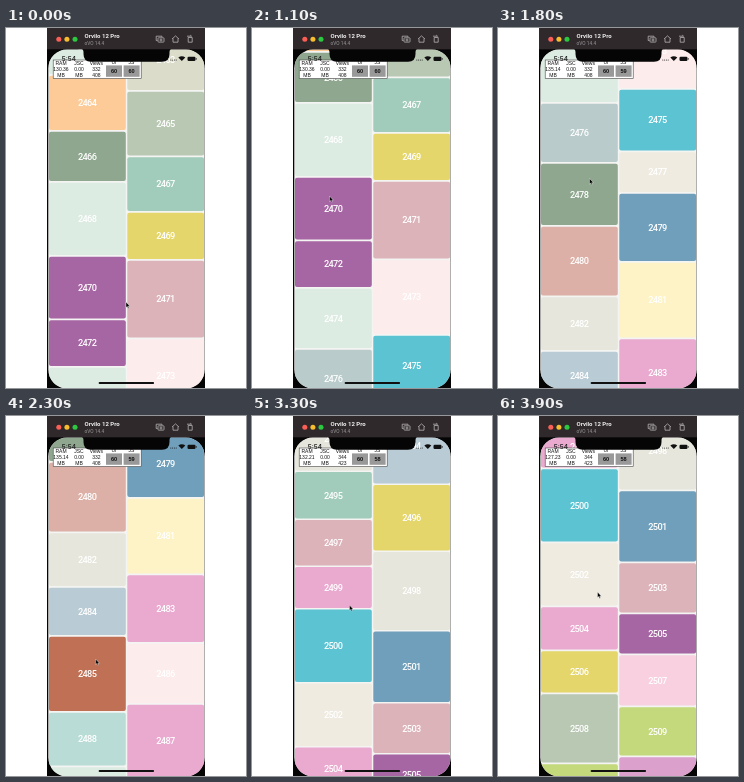
An HTML page for the animation above (4 s loop, 240x360 px).

```html
<!DOCTYPE html>
<html lang="en">
<head>
<meta charset="utf-8">
<title>Masonry list scroll</title>
<style>
  html, body { margin: 0; width: 100%; height: 100%; overflow: hidden; background: #fff; }
  svg { display: block; width: 240px; height: 360px; font-family: Roboto, "Liberation Sans", sans-serif; }
  .tile { font-size: 9.2px; font-weight: 500; letter-spacing: -.65px; fill: #fff; text-anchor: middle; }
  .stats { font: 5px "Liberation Sans", Arial, sans-serif; text-anchor: middle; fill: #111; }
  .fps { font-weight: 700; font-size: 5.6px; }
  .clock { font: 600 6.4px Inter, sans-serif; fill: #222; }
  .icon { fill: none; stroke: #b5b1b3; stroke-width: .8; stroke-linejoin: round; }
</style>
</head>
<body>
<svg viewBox="0 0 240 360">
  <defs>
    <clipPath id="screen"><rect x="42.3" y="21.5" width="156.4" height="339" rx="19"/></clipPath>
  </defs>

  <rect x="41" width="158" height="360" fill="#050505"/>
  <g clip-path="url(#screen)">
    <rect x="42" y="21" width="157" height="339" fill="#f4f4f2"/>
    <g id="list" class="tile"></g>
  </g>

  <g class="stats">
    <rect x="47.2" y="32" width="88" height="18.6" fill="#fff" stroke="#444" stroke-width=".6"/>
    <text x="55" y="37.3">RAM</text><text id="ram" x="55" y="43.3"></text><text x="55" y="49.3">MB</text>
    <text x="73" y="37.3">JSC</text><text x="73" y="43.3">0.00</text><text x="73" y="49.3">MB</text>
    <text x="90.3" y="37.3">Views</text><text id="views" x="90.3" y="43.3"></text><text id="total" x="90.3" y="49.3"></text>
    <text x="108" y="36">UI</text><text x="125.3" y="36">JS</text>
    <rect x="100" y="37.4" width="16" height="11.4" fill="#999"/>
    <rect x="117.6" y="37.4" width="16" height="11.4" fill="#999"/>
    <text class="fps" x="108" y="45.2">60</text>
    <text id="js" class="fps" x="125.5" y="45.2"></text>
  </g>
  <text class="clock" x="55.8" y="33.3">5:54</text>
  <path d="M74 20H167Q163.5 21 163.5 24V26Q163.5 33.8 156 33.8H85Q77.5 33.8 77.5 26V24Q77.5 21 74 20Z" fill="#050505"/>

  <g fill="#111">
    <circle cx="164.8" cy="32" r=".5"/><circle cx="166.6" cy="32" r=".5"/>
    <circle cx="168.4" cy="32" r=".5"/><circle cx="170.2" cy="32" r=".5"/>
    <path d="M172.3 29.5Q175.8 26.8 179.3 29.5L175.8 33Z"/>
    <rect x="181.5" y="28.8" width="8" height="4.2" rx="1.2"/>
    <rect x="189.9" y="30.1" width=".7" height="1.6"/>
    <rect x="92.6" y="354" width="55.5" height="2" rx="1"/>
  </g>

  <rect x="41" width="158" height="21.3" fill="#2f292c"/>
  <circle cx="52.8" cy="11.2" r="2.5" fill="#f95f56"/>
  <circle cx="60.9" cy="11.2" r="2.5" fill="#f8bd2e"/>
  <circle cx="69" cy="11.2" r="2.5" fill="#2cc840"/>
  <text x="78.5" y="10.4" font-size="6" font-weight="700" fill="#eee">Orvilo 12 Pro</text>
  <text x="78.5" y="16.5" font-size="4.8" fill="#9b9799">oVO 14.4</text>
  <g class="icon">
    <path d="M151.5 12.5H150.2V8.2H156V9.2"/>
    <rect x="152" y="9.8" width="6" height="4.3" rx=".6"/><circle cx="155" cy="12" r="1"/>
    <path d="M166 11L169.5 7.9L173 11M167 10.5V14.2H172V10.5"/>
    <path d="M182.2 9.5H186.2V14.2H182.2ZM181 8.2H185.5M184.3 7.2L185.5 8.2"/>
  </g>

  <path id="cursor" d="M0 0V5.6L1.3 4.5L2.1 6.4L3 6L2.2 4.2H3.9Z" fill="#000" stroke="#fff" stroke-width=".4"/>
</svg>

<script>
const LOOP = 4000, STEP = 100;
const $ = id => document.getElementById(id);

const C = {
  mint: '#dcece2', peach: '#fdcb98', moss: '#8fa78f', plum: '#a665a3', mist: '#b9cbcb',
  clay: '#dcb0a6', stone: '#e6e6dc', steel: '#b9cbd4', rust: '#c07054', aqua: '#b9ddd6',
  jade: '#a1cbba', rose: '#dcb3b9', pink: '#eaa9cf', cyan: '#5cc3d2', cream: '#efebe1',
  gold: '#e5d66c', sage: '#b9c8b3', lime: '#c4d87c', blush: '#fdecec', blue: '#709fbb',
  lemon: '#fdf3c7', ice: '#b9d0d3', petal: '#f8d0df', orchid: '#dca0cc', sand: '#dcdccb'
};

// Tiles: label, row height, colour
const left = [
  [2462, 57, 'mint'], [2464, 56, 'peach'], [2466, 51, 'moss'], [2468, 74, 'mint'],
  [2470, 63.5, 'plum'], [2472, 47.5, 'plum'], [2474, 61, 'mint'], [2476, 60, 'mist'],
  [2478, 63, 'moss'], [2480, 70.5, 'clay'], [2482, 54.5, 'stone'], [2484, 49, 'steel'],
  [2485, 76, 'rust'], [2488, 54.5, 'aqua'], [2489, 49.5, 'mint'], [2491, 60.5, 'peach'],
  [2493, 64.5, 'stone'], [2495, 48, 'jade'], [2497, 47, 'rose'], [2499, 42.5, 'pink'],
  [2500, 74, 'cyan'], [2502, 64, 'cream'], [2504, 44, 'pink'], [2506, 43, 'gold'],
  [2508, 70, 'sage'], [2510, 60, 'lime']
];
const right = [
  [2463, 63, 'sand'], [2465, 65.5, 'sage'], [2467, 55.5, 'jade'], [2469, 48, 'gold'],
  [2471, 78.5, 'rose'], [2473, 75.5, 'blush'], [2475, 62.5, 'cyan'], [2477, 41.5, 'cream'],
  [2479, 69, 'blue'], [2481, 76.5, 'lemon'], [2483, 68.5, 'pink'], [2486, 61, 'blush'],
  [2487, 74, 'pink'], [2490, 52, 'sage'], [2492, 47, 'ice'], [2494, 77, 'steel'],
  [2496, 67, 'gold'], [2498, 79.5, 'stone'], [2501, 72, 'blue'], [2503, 51, 'rose'],
  [2505, 41, 'plum'], [2507, 52, 'petal'], [2509, 50, 'lime'], [2511, 60, 'orchid']
];

function add(tag, attrs, text = '') {
  const el = document.createElementNS('http://www.w3.org/2000/svg', tag);
  for (const k in attrs) el.setAttribute(k, attrs[k]);
  el.textContent = text;
  $('list').append(el);
}

function column(tiles, x, y) {
  for (const [label, h, colour] of tiles) {
    add('rect', { x, y, width: 76.8, height: h - 1.7, rx: 2, fill: C[colour] });
    add('text', { x: x + 38.1, y: y + h / 2 + 2.4 }, label);
    y += h;
  }
}
column(left, 43, -9.2);
column(right, 121.3, 0.8);

// Monotone cubic curve through [time, value] points
function curve(pts) {
  const d = pts.slice(1).map((p, i) => (p[1] - pts[i][1]) / (p[0] - pts[i][0]));
  const m = pts.map((_, i) => {
    const a = d[i - 1] ?? d[i], b = d[i] ?? a;
    return a * b > 0 ? 2 * a * b / (a + b) : 0;
  });
  return t => {
    let i = 0;
    while (i < pts.length - 2 && t >= pts[i + 1][0]) i++;
    const [t0, v0] = pts[i], [t1, v1] = pts[i + 1];
    const w = t1 - t0, u = (t - t0) / w, r = 1 - u;
    return v0 * (1 + 2 * u) * r * r + v1 * u * u * (3 - 2 * u) + w * u * r * (m[i] * r - m[i + 1] * u);
  };
}

const scroll = curve([[0, 0], [700, 10], [1100, 79], [1450, 198], [1800, 325], [2300, 477],
  [2600, 640], [2900, 798], [3200, 920], [3600, 1013], [3900, 1087], [4000, 1122]]);
const cursorX = curve([[0, 120], [700, 105], [1100, 77.5], [1800, 91.5], [2300, 89.6], [2900, 93], [3600, 99.5], [4000, 99.5]]);
const cursorY = curve([[0, 274], [700, 266], [1100, 168], [1200, 153], [1500, 241], [1800, 150.5], [2300, 243],
  [2550, 160], [2900, 241.5], [3150, 165], [3600, 258], [3900, 176], [4000, 156]]);

// From time: memory, views, total views, JS frame rate
const stats = [
  [0, '130.36', 332, 408, 60], [1500, '135.14', 332, 408, 59],
  [2600, '132.21', 344, 423, 59], [3200, '132.21', 344, 423, 58], [3700, '127.23', 344, 423, 58]
];

function draw(now) {
  const t = Math.floor(now % LOOP / STEP) * STEP;
  $('list').setAttribute('transform', `translate(0 ${-scroll(t)})`);
  $('cursor').setAttribute('transform', `translate(${cursorX(t)} ${cursorY(t)})`);
  const row = stats.filter(s => s[0] <= t).pop();
  ['ram', 'views', 'total', 'js'].forEach((id, i) => $(id).textContent = row[i + 1]);
}

const start = performance.now();
function tick() {
  draw(performance.now() - start);
  requestAnimationFrame(tick);
}
tick();
</script>
</body>
</html>
```
